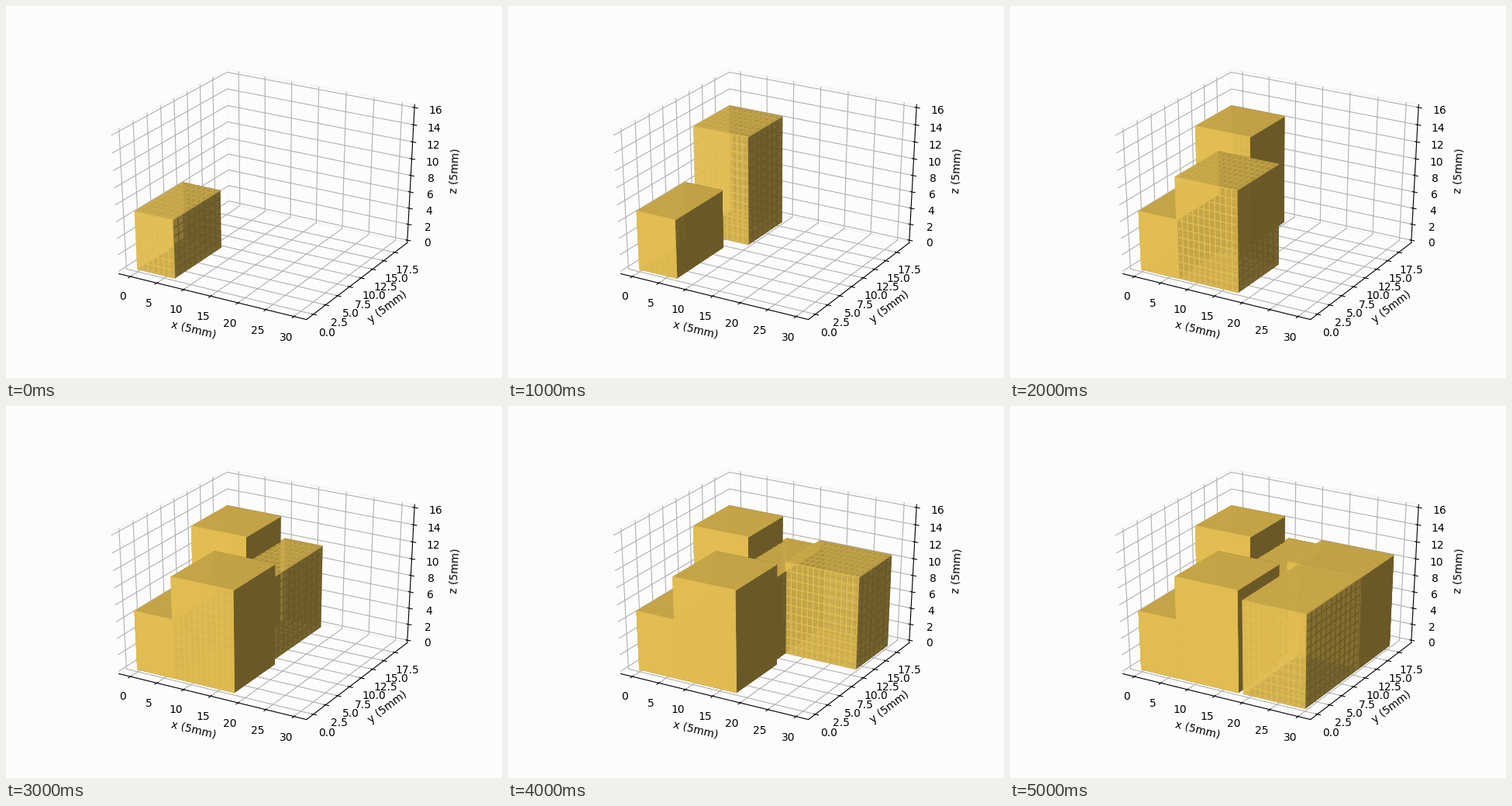
A matplotlib script for the animation above (6 s loop, 640 by 480 pixels).

```python
import numpy as np
import matplotlib.pyplot as plt
from matplotlib.animation import FuncAnimation
from matplotlib.colors import to_rgb
from mpl_toolkits.mplot3d import Axes3D
from mpl_toolkits.mplot3d.art3d import Poly3DCollection

BG = "#fcfcfc"
YELLOW = np.array(to_rgb("#ffd65d"))
ALPHA = 0.753
LIGHT = np.array([-2, -2, 1]) / 3
SIZE = (30, 19, 16)

# (start, end) along x, y and z, in packing order
BOXES = [
    ((0, 7), (0, 9), (0, 7)),
    ((0, 10), (11, 18), (0, 13)),
    ((7, 18), (0, 8), (0, 12)),
    ((10, 17), (8, 19), (0, 10)),
    ((17, 30), (11, 18), (0, 11)),
    ((19, 30), (0, 11), (0, 11)),
]


class WideAxes(Axes3D):
    """3D axes that fill their whole rectangle instead of a square."""

    def apply_aspect(self, position=None):
        pass


def shell(filled):
    """Exposed unit faces of the filled cells, with shaded colours."""
    padded = np.pad(filled, 1)
    quads, colors = [], []
    for axis in range(3):
        u, v = [a for a in range(3) if a != axis]
        for sign in (-1, 1):
            open_side = padded & ~np.roll(padded, -sign, axis)
            cells = np.argwhere(open_side) - 1
            corners = np.zeros((4, 3))
            corners[:, axis] = sign > 0
            corners[:, u] = 0, 1, 1, 0
            corners[:, v] = 0, 0, 1, 1
            quads.append(cells[:, None] + corners)
            shade = 0.65 + 0.35 * sign * LIGHT[axis]
            colors.append(np.tile([*(YELLOW * shade), ALPHA], (len(cells), 1)))
    return np.concatenate(quads), np.concatenate(colors)


def build_shells():
    filled = np.zeros(SIZE, bool)
    shells = []
    for spans in BOXES:
        filled[tuple(slice(*s) for s in spans)] = True
        shells.append(shell(filled))
    return shells


fig = plt.figure(figsize=(6.4, 4.8), dpi=100, facecolor=BG)
ax = fig.add_subplot(axes_class=WideAxes)
ax.set_facecolor("none")
ax.view_init(elev=30, azim=-60)
ax.set_box_aspect((1, 1, 1), zoom=3 ** 0.5 / 1.8294640721620434)

nx, ny, nz = SIZE
ax.set_xlim(-0.05 * nx, 1.05 * nx, view_margin=1 / 48)
ax.set_ylim(-0.05 * ny, 1.05 * ny, view_margin=1 / 48)
ax.set_zlim(0, nz, view_margin=1 / 48)
ax.set_xticks(np.arange(0, 31, 5))
ax.set_yticks(np.arange(0, 18, 2.5))
ax.set_zticks(np.arange(0, 17, 2))
ax.set_xlabel("x (5mm)")
ax.set_ylabel("y (5mm)")
ax.set_zlabel("z (5mm)")
for axis in (ax.xaxis, ax.yaxis, ax.zaxis):
    axis.set_pane_color(BG)
    axis.pane.set_edgecolor("#f4f4f4")

SHELLS = build_shells()


def update(step):
    # each step paints the whole pile again over the earlier layers
    for old in list(ax.collections):
        old.remove()
    layers = SHELLS[:step + 1]
    quads = np.concatenate([q for q, _ in layers])
    colors = np.concatenate([c for _, c in layers])
    pile = Poly3DCollection(quads, facecolors=colors, edgecolors=colors,
                            linewidths=1)
    ax.add_collection3d(pile)
    return [pile]


anim = FuncAnimation(fig, update, frames=len(BOXES), interval=1000,
                     repeat=True, repeat_delay=0, blit=False)
plt.show()
```
